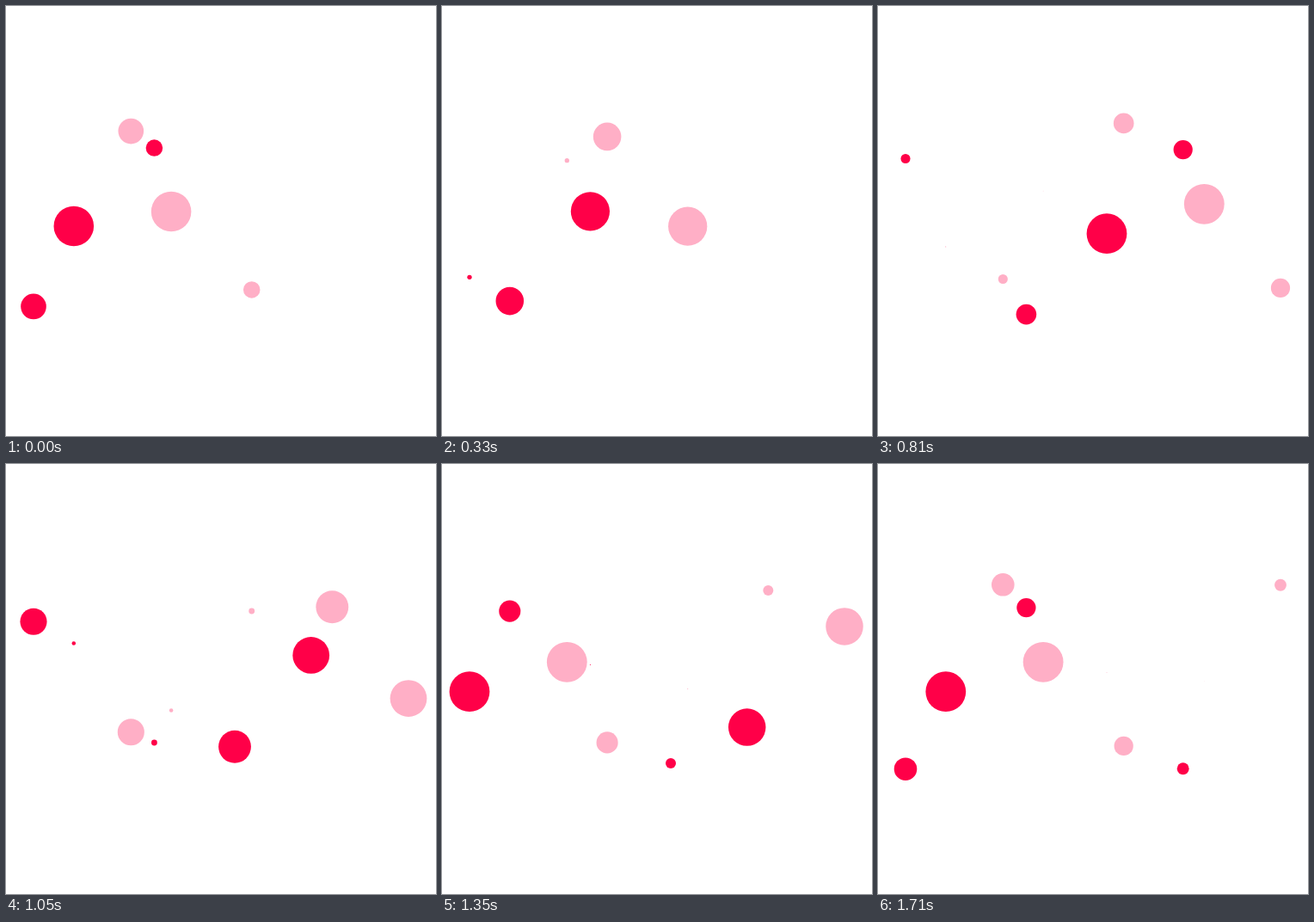
Animation, 500 px wide and 500 px high, one loop 1.74 s. Source, as an HTML page:

```html
<!DOCTYPE html>
<html lang="en">
<head>
<meta charset="utf-8">
<title>Dot helix</title>
<style>
  html, body { margin: 0; width: 100%; height: 100%; overflow: hidden; background: #fff; }
  svg { display: block; width: 100%; height: 100%; }
  .back { fill: #ffafc6; }
  .front { fill: #ff0048; }
</style>
</head>
<body>
<svg viewBox="0 0 500 500"></svg>
<script>
  const STEP = 30;      // ms per step
  const STEPS = 58;     // steps per loop
  const TURN = 56;      // steps per orbit
  const TOP = 25.5;     // phase of the highest point
  const BOTTOM = 54.6;  // phase of the lowest point
  const MIDDLE = 262.9;
  const MIRROR = 495;   // the pink dots mirror the red ones
  const GAP = 113.3;

  const columns = [
    { x: 32, phase: 51 },
    { x: 78.8, phase: 39 },
    { x: 172.4, phase: 26 },
    { x: 266, phase: 13 },
    { x: 354.7, phase: 0 }
  ];

  const svg = document.querySelector('svg');

  function addDot(kind, x) {
    const dot = document.createElementNS('http://www.w3.org/2000/svg', 'circle');
    dot.setAttribute('class', kind);
    dot.setAttribute('cx', x);
    svg.append(dot);
    return dot;
  }

  for (const c of columns) c.back = addDot('back', c.x + GAP);
  for (const c of columns) c.front = addDot('front', c.x);

  // Offset from the middle along one sweep, p from 0 to 1: quick turns, steady middle
  function sweep(p) {
    const a = Math.PI * p;
    return -90.7 * Math.cos(a) - 6 * Math.cos(3 * a) - 1.4 * Math.cos(5 * a)
      + 72 * p ** 3 * (1 - p) ** 2;
  }

  function height(u) {
    const v = (u - TOP + TURN) % TURN;
    const down = BOTTOM - TOP;
    return v < down
      ? MIDDLE + sweep(v / down)
      : MIDDLE - sweep((v - down) / (TURN - down));
  }

  function radius(u) {
    const a = (u - 40.25) * 2 * Math.PI / TURN;
    return Math.max(0, 11.7 * (1 + Math.cos(a)) - 1.6 * Math.sin(a) ** 6);
  }

  function place(dot, y, r) {
    dot.setAttribute('cy', y.toFixed(2));
    dot.setAttribute('r', r.toFixed(2));
  }

  function draw(time) {
    const step = Math.floor(time / STEP) % STEPS;
    for (const c of columns) {
      const age = step + c.phase;
      const u = age % TURN;
      const y = height(u);
      const r = age < TOP ? 0 : radius(u);  // later columns wait for their turn
      place(c.front, y, r);
      place(c.back, MIRROR - y, r);
    }
  }

  const start = performance.now();
  function tick() {
    draw(performance.now() - start);
    requestAnimationFrame(tick);
  }
  tick();
</script>
</body>
</html>
```
